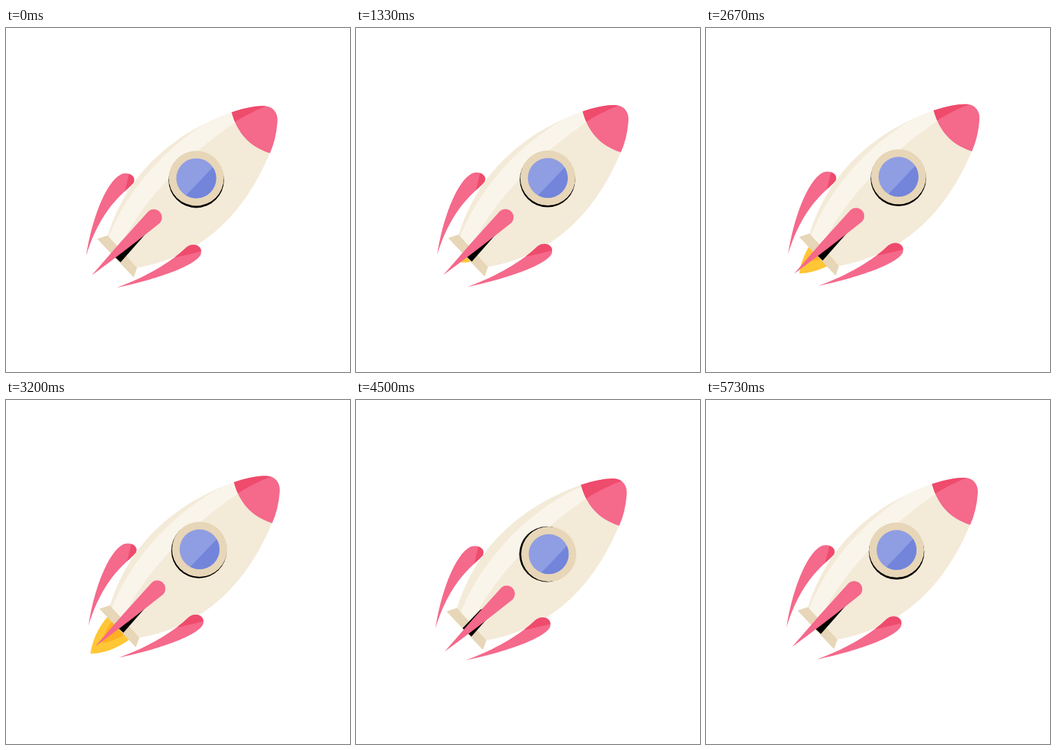
An HTML page that plays this animation: 500x500 px, repeating every 5770 ms.

```html
<!DOCTYPE html>
<html lang="en">
<head>
<meta charset="utf-8">
<title>Rocket</title>
<style>
html, body { margin: 0; width: 100%; height: 100%; overflow: hidden; background: #fff; }
svg { display: block; width: 100vw; height: 100vh; }
</style>
</head>
<body>
<svg viewBox="0 0 500 500">
  <defs>
    <path id="hull" d="M329 122C250 150 178 205 148 302L191 348C292 330 350 262 384 181Z"/>
    <path id="nozzle" d="M133 306L148 301L191 348L186 362Z"/>
    <path id="cap" d="M328.5 122Q360 112 377 113C390 114 396 124 395 136Q393 162 384 181.5C352 171 336 150 328.5 122Z"/>
    <path id="finLeft" d="M117 331C124 283 144 224 168 212C180 208 190 216 186 224C178 236 140 255 117 331Z"/>
    <path id="finRight" d="M161 377C205 361 240 340 263 318C272 311 286 315 284 327C281 342 228 363 161 377Z"/>
    <clipPath id="inHull"><use href="#hull"/></clipPath>
    <clipPath id="inShell"><use href="#hull"/><use href="#nozzle"/></clipPath>
    <clipPath id="inCap"><use href="#cap"/></clipPath>
    <clipPath id="inLeft"><use href="#finLeft"/></clipPath>
    <clipPath id="inRight"><use href="#finRight"/></clipPath>
    <clipPath id="inGlass"><circle cx="277" cy="218" r="29"/></clipPath>
  </defs>
  <g id="rocket">
    <!-- Flames point along +x, with the tip at the origin -->
    <path id="outer" fill="#ffc635" d="M0 0C-18 15 -42 23 -68 23Q-96 20 -112 0Q-96 -22 -68 -24C-42 -24 -18 -16 0 0Z"/>
    <path id="inner" fill="#ffb021" d="M0 0C-14 10 -30 14 -48 14Q-70 12 -84 0Q-70 -12 -48 -14C-30 -14 -14 -10 0 0Z"/>
    <use href="#hull" fill="#f3ead8"/>
    <g clip-path="url(#inHull)">
      <path id="shine" fill="#faf5eb" d="M345 112C262 142 182 218 148 308L164 322C190 266 248 192 345 129Z"/>
    </g>
    <use href="#nozzle" fill="#e7d6b7"/>
    <use href="#cap" fill="#f5698b"/>
    <g clip-path="url(#inCap)">
      <path id="capShade" fill="#ef4b6c" d="M320 145Q352 122 390 109V90H300Z"/>
    </g>
    <use href="#finLeft" fill="#f5698b"/>
    <path clip-path="url(#inLeft)" fill="#ef4b6c" d="M181 205L172 242L200 242V205Z"/>
    <use href="#finRight" fill="#f5698b"/>
    <path clip-path="url(#inRight)" fill="#ef4b6c" d="M247 333L290 323V305H247Z"/>
    <circle id="ringShadow" cx="277" cy="220.7" r="40.3"/>
    <g id="port">
      <circle cx="277" cy="218" r="40" fill="#e7d6b7"/>
      <circle cx="277" cy="218" r="29" fill="#8f9de3"/>
      <g clip-path="url(#inGlass)">
        <path id="glassShade" fill="#7285db" d="M320 182L243 263H320Z"/>
      </g>
    </g>
    <g clip-path="url(#inShell)">
      <path id="finShadow" d="M154 328L180 301L212 289L167 340Z"/>
    </g>
    <path id="finMid" fill="#f5698b" d="M125 359Q166 311 207 266.5A11.8 11.8 0 0 1 223.5 283.5Q174 323 125 359Z"/>
  </g>
</svg>
<script>
const LOOP = 5770, CYCLE = LOOP / 4, PEAK = 372;
const $ = id => document.getElementById(id);
const smooth = x => x * x * (3 - 2 * x);
const linear = x => x;

// Interpolates [time, value] keys, easing each span.
function track(keys, t, ease) {
  const i = keys.findIndex(k => k[0] > t);
  if (i < 0) return keys[keys.length - 1][1];
  if (!i) return keys[0][1];
  const [t0, a] = keys[i - 1], [t1, b] = keys[i];
  return a + (b - a) * ease((t - t0) / (t1 - t0));
}

const thrustKeys = [[0, 5.8], [77, 7], [250, 6.8], [500, 5.8], [1250, -1.5], [1520, 7]];
const swayKeys = [[0, 0], [800, 1], [2500, .3], [4500, 4.6], [LOOP, 0]];
const flameKeys = [[0, 86], [40, 77], [90, 69], [160, 64], [298, 60], [473, 57],
  [650, 50], [855, 37], [1030, -6], [1250, -6], [1360, 40], [CYCLE, 86]];

const shift = (id, x, y = x) => $(id).setAttribute('transform', `translate(${x} ${y})`);

function flame(id, length) {
  $(id).setAttribute('transform', `translate(160 334) rotate(137) translate(${length} 0)`);
}

function draw(time) {
  const t = time % LOOP;
  const phase = (t - PEAK + CYCLE) % CYCLE;
  const thrust = track(thrustKeys, phase, smooth);
  const sway = track(swayKeys, t, smooth);
  const reach = track(flameKeys, phase, linear);

  shift('rocket', thrust, -thrust * .9);
  flame('outer', reach);
  flame('inner', reach - 20 - Math.max(0, 69 - reach) * .2);
  shift('shine', sway * .9);
  shift('capShade', sway);
  shift('ringShadow', sway * .45);
  shift('port', sway);
  shift('glassShade', sway * .7);
  shift('finShadow', sway * .5);
  shift('finMid', sway * 1.15);
}

const start = performance.now();
function tick() {
  draw(performance.now() - start);
  requestAnimationFrame(tick);
}
tick();
</script>
</body>
</html>
```
